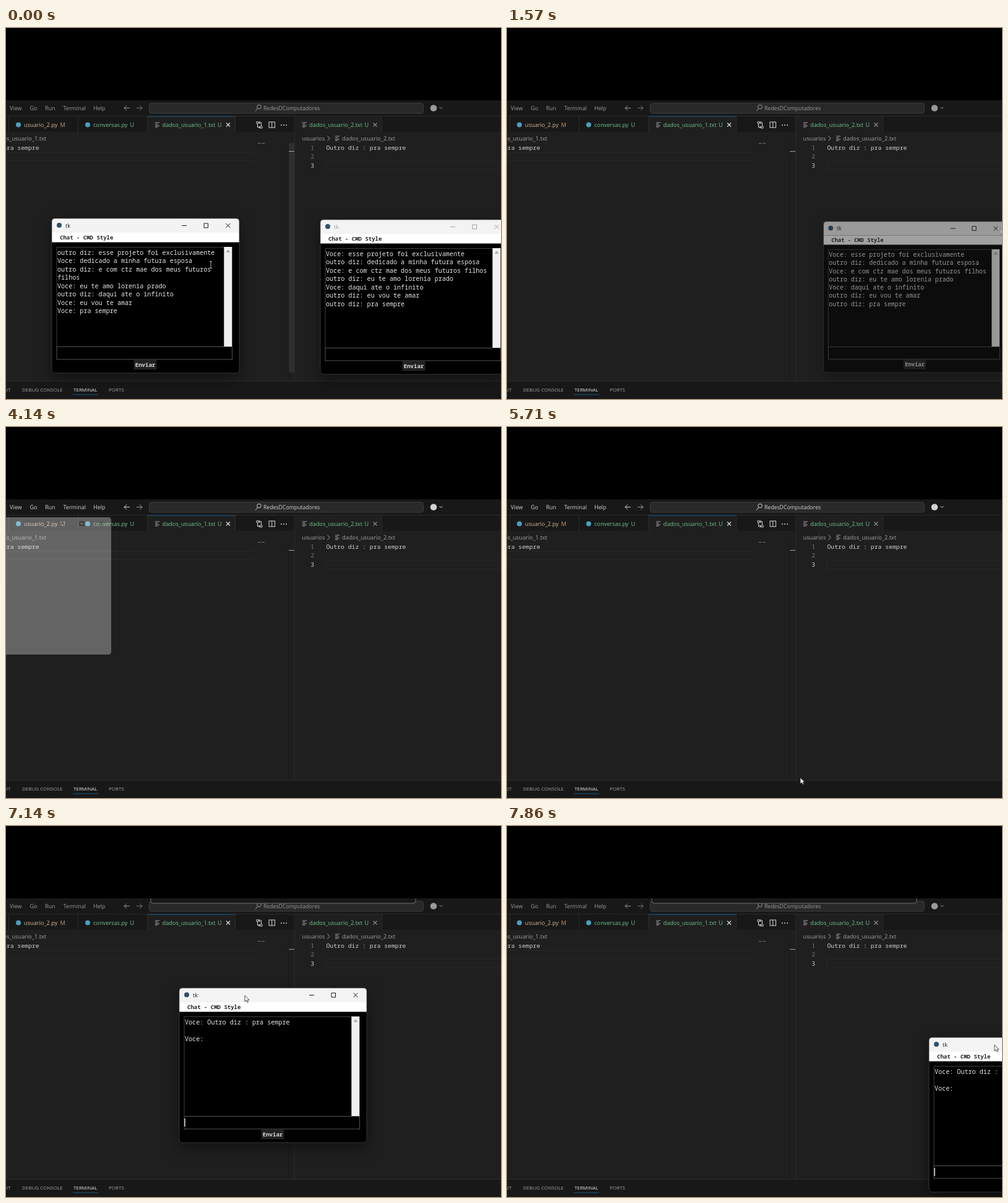
An HTML page for the animation above (8000 ms loop, 800x600 px).

```html
<!DOCTYPE html>
<html lang="pt-BR">
<head>
<meta charset="utf-8">
<title>Chat - CMD Style</title>
<style>
html, body { margin: 0; width: 100%; height: 100%; overflow: hidden; background: #000; }
svg { display: block; width: 800px; height: 600px; }
text { font-family: "Open Sans", "Noto Sans", sans-serif; font-size: 9.2px; fill: #a2a2a2; }
.mono { font-family: "Noto Sans Mono", "DejaVu Sans Mono", monospace; font-size: 9.77px; font-weight: 500; fill: #d0d0d0; }
.num { fill: #6e7681; text-anchor: end; }
.end { text-anchor: end; }
.line { fill: none; stroke: #a2a2a2; }
.green { fill: #70c48d; }
.small { font-size: 8px; }
#bar { color: #9a9a9a; }
#bar.focus { color: #d2d2d2; }
#bar text { fill: currentColor; font-size: 9px; }
#bar .line { stroke: currentColor; }
.chat { font-size: 10.1px; font-weight: 500; fill: #e6e6e6; }
.bold { font-size: 9px; font-weight: 700; }
.win { --ink: #1a1a1a; filter: drop-shadow(0 8px 12px rgba(0, 0, 0, .45)); }
.win.idle { --ink: #a0a0a0; }
.win .title { fill: var(--ink); font-size: 9px; }
.win .ctl { fill: none; stroke: var(--ink); }
</style>
</head>
<body>
<svg viewBox="0 0 800 600">
  <defs>
    <g id="file" class="line"><path d="M0 -3H7M0 -.5H4.5M0 2H7M0 4H4.5" stroke-width="1"/></g>
    <g id="cross"><path d="M-3 -3L3 3M3 -3L-3 3" fill="none" stroke-width="1.1"/></g>
  </defs>

  <rect width="800" height="600" fill="#000"/>
  <rect y="117" width="800" height="483" fill="#181818"/>
  <path d="M0 142.5H800" stroke="#2b2b2b"/>
  <rect y="168" width="800" height="404" fill="#1f1f1f"/>

  <g id="bar">
    <rect x="231.500" y="121.500" width="443" height="16.500" rx="4" fill="#292929" stroke="#3d3d3d"/>
    <text x="6" y="133.300">View</text><text x="38.500" y="133.300">Go</text>
    <text x="63" y="133.300">Run</text><text x="92.500" y="133.300">Terminal</text>
    <text x="141" y="133.300">Help</text>
    <path class="line" d="M200 129.500H191M195 125.500L191 129.500L195 133.500"/>
    <path class="line" d="M211 129.500H220M216 125.500L220 129.500L216 133.500" opacity=".7"/>
    <g class="line"><circle cx="409" cy="127.500" r="3.300"/><path d="M406.700 130L403 134.500"/></g>
    <text x="416" y="133" style="font-size:8.700px">RedesDComputadores</text>
    <circle cx="691" cy="129.500" r="5.300" fill="currentColor"/>
    <path class="line" d="M700.500 128L703 130.500L705.500 128"/>
  </g>

  <!-- tabs -->
  <rect x="229" y="143" width="141" height="26" fill="#1f1f1f"/>
  <rect x="468" y="143" width="139" height="26" fill="#1f1f1f"/>
  <path d="M4.500 143V168M116.500 143V168M228.500 143V168M370.500 143V168M607.500 143V168" stroke="#2b2b2b"/>
  <path d="M229 143H370" stroke="#17598c"/>
  <circle cx="20" cy="156.500" r="4" fill="#4c9dc0"/>
  <text x="29" y="160" style="fill:#d8b896">usuario_2.py</text>
  <text x="87.500" y="160" style="fill:#c9986f">M</text>
  <circle cx="132" cy="156.500" r="4" fill="#4c9dc0"/>
  <text x="141" y="160" class="green">conversas.py</text><text x="200.500" y="160" class="green">U</text>
  <use href="#file" x="241" y="156"/>
  <text x="252.500" y="160" class="green">dados_usuario_1.txt</text><text x="342" y="160" class="green">U</text>
  <use href="#cross" x="359" y="156.500" stroke="#e4e4e4"/>
  <g class="line" stroke-width="1.100" style="stroke:#c8c8c8">
    <circle cx="406.500" cy="153" r="1.700"/><circle cx="412.500" cy="160.500" r="1.700"/>
    <path d="M406.500 155V160.500H410M408.500 158.500L410.300 160.500L408.500 162.500M412.500 158.500V153H409M410.500 151L408.700 153L410.500 155"/>
    <rect x="425" y="152" width="9.500" height="9"/><path d="M429.700 152V161"/>
  </g>
  <g fill="#c8c8c8"><circle cx="445" cy="157" r="1"/><circle cx="449" cy="157" r="1"/><circle cx="453" cy="157" r="1"/></g>
  <use href="#file" x="479" y="156"/>
  <text x="490" y="160" class="green">dados_usuario_2.txt</text><text x="579.500" y="160" class="green">U</text>
  <use href="#cross" x="596.500" y="156.500" stroke="#8c8c8c"/>

  <!-- left editor -->
  <text x="65" y="182" class="end">dados_usuario_1.txt</text>
  <text x="53.500" y="196.700" class="mono end">Outro diz : pra sempre</text>
  <path d="M0 201.500H400M0 214.500H400" stroke="#282828"/>
  <path d="M407 186.500H411M412 186.500H413M414 186.500H418" stroke="#777"/>
  <path d="M456.500 186V572" stroke="#181818"/>
  <rect id="slider" x="457" y="186" width="9.500" height="371" fill="#2f2f2f"/>
  <path d="M457 199.500H466" stroke="#a0a0a0"/>
  <path d="M466.500 143V572" stroke="#2b2b2b"/>

  <!-- right editor -->
  <text x="478.500" y="182">usuarios</text>
  <path class="line" d="M519.500 174.500L523 178.500L519.500 182.500"/>
  <use href="#file" x="532" y="178"/>
  <text x="543" y="182">dados_usuario_2.txt</text>
  <text x="498" y="196.700" class="mono num">1</text>
  <text x="498" y="211.300" class="mono num">2</text>
  <text x="498" y="226" class="mono num" style="fill:#ccc">3</text>
  <text x="517.500" y="196.700" class="mono">Outro diz : pra sempre</text>
  <rect x="517.500" y="215.500" width="290" height="13.500" fill="none" stroke="#272727"/>

  <!-- panel -->
  <path d="M0 571.500H800" stroke="#2b2b2b"/>
  <text x="7.500" y="588.200" class="small end">OUTPUT</text>
  <text x="26" y="588.200" class="small">DEBUG CONSOLE</text>
  <text x="109" y="588.200" class="small" style="fill:#e2e2e2">TERMINAL</text>
  <text x="166" y="588.200" class="small">PORTS</text>
  <path d="M108 593H149" stroke="#17598c"/>

  <path id="snap" d="M234 117V121Q234 125 238 125H658Q662 125 662 121V117" fill="#181818" stroke="#707070"/>
  <g id="wins"></g>
  <g id="ghost"><rect width="303" height="250" rx="5" fill="#fff"/>
    <path d="M210 11.500H217M246 8H253V15H246ZM282 8L288 14M288 8L282 14" fill="none" stroke="#000"/></g>

  <g id="arrow"><path d="M0 0V10L2.400 7.900L4 11.300L5.600 10.500L4.100 7.200H7Z" fill="#fff" stroke="#222" stroke-width=".8"/></g>
  <g id="ibeam"><path d="M-2 -5.500H2M0 -5.500V5.500M-2 5.500H2" fill="none" stroke="#b5b5b5"/></g>
  <g id="resize"><path d="M0 -6L3 -2.500H.8V2.500H3L0 6L-3 2.500H-.8V-2.500H-3Z" fill="#fff" stroke="#222" stroke-width=".8"/></g>
</svg>
<script>
const W = 303, H = 250, FRAMES = 56, LOOP = 8000;
const $ = id => document.getElementById(id);

function makeWin(lines, caret) {
  const g = document.createElementNS("http://www.w3.org/2000/svg", "g");
  const rows = lines.map((s, i) =>
    `<text class="mono chat" x="9" y="${58.5 + i * 13.57}">${s}</text>`).join("");
  g.setAttribute("class", "win");
  g.innerHTML = `
    <rect width="${W}" height="${H}" rx="5" fill="#000"/>
    <path d="M0 23V5Q0 0 5 0H298Q303 0 303 5V23Z" fill="#f3f3f3"/>
    <rect y="23" width="${W}" height="15.500" fill="#fff"/>
    <circle cx="12" cy="11" r="4" fill="#31506f"/>
    <text class="title" x="22" y="14.500">tk</text>
    <path class="ctl" d="M210 11.500H218M246 8H252.500V15H246ZM281.500 8L288.500 15M288.500 8L281.500 15"/>
    <text class="mono bold" x="13" y="34.200" style="fill:#222">Chat - CMD Style</text>
    <path d="M8 207.500V46.500H279" fill="none" stroke="#404040"/>
    <rect x="278.300" y="46" width="13" height="161" fill="#f0f0f0"/>
    <path d="M281.500 55L285 50L288.500 55Z" fill="#b0b0b0"/>
    <rect x="8" y="207.500" width="283.500" height="20.500" fill="#000" stroke="#5c5c5c" stroke-width=".9"/>
    <rect x="132.500" y="229" width="37" height="15.500" fill="#222"/>
    <text class="mono bold" x="134.800" y="239.700" style="fill:#ddd">Enviar</text>
    ${rows}
    ${caret ? '<path d="M9 211V224" stroke="#fff" stroke-width="1.300"/>' : ""}
    <rect width="${W}" height="${H}" rx="5" fill="none" stroke="#484848" stroke-width=".7"/>`;
  $("wins").append(g);
  return g;
}

const talk = [
  "esse projeto foi exclusivamente", "dedicado a minha futura esposa",
  "e com ctz mae dos meus futuros filhos", "eu te amo lorenia prado",
  "daqui ate o infinito", "eu vou te amar", "pra sempre"];
const said = mine => talk.map((s, i) => (mine.includes(i) ? "Voce: " : "outro diz: ") + s);
const leftLines = said([1, 3, 5, 6]);
leftLines.splice(2, 1, leftLines[2].replace(" filhos", ""), "filhos");
const fresh = ["Voce: Outro diz : pra sempre", "", "Voce:"];

const right = makeWin(said([0, 2, 4]));
const left = makeWin(leftLines);
const first = makeWin(fresh, true);
const second = makeWin(fresh, true);

// Places an element by its unscaled corner, scaled around the window centre.
function pose(el, x, y, alpha = 1, k = 1) {
  el.style.display = alpha > 0 ? "" : "none";
  el.setAttribute("opacity", alpha);
  el.setAttribute("transform",
    `translate(${x + W / 2 * (1 - k)} ${y + H / 2 * (1 - k)}) scale(${k})`);
}

// Fade and shrink over three steps, starting at step n.
function closing(el, x, y, f, n) {
  const i = f - n;
  const [a, k] = i < 0 ? [1, 1] : i === 0 ? [.58, .977] : i === 1 ? [.15, .92] : [0, 1];
  pose(el, x, y, a, k);
}

const start = [-88.5, 156.5];
const drag = [[-60, 165], [90, 205], [280, 262], [430, 300], [515, 318], [575, 326], [635, 335], [682, 342]];
const toClose = [[331, 383], [347, 343], [357, 318], [358, 318], [430, 319], [600, 321], [740, 322], [787, 323], [787, 323], [795, 324], [797, 324], [797, 324]];
const toTop = [[474, 567], [420, 530], [330, 450], [220, 340], [120, 250], [50, 185], [21, 160], [19, 168]];

function cursor(f, wx, wy) {
  const p = f < 12 ? toClose[f] : f < 40 ? null : f < 48 ? toTop[f - 40] : [wx + 106, wy + 12];
  const kind = f === 0 ? "ibeam" : f === 46 ? "resize" : "arrow";
  for (const id of ["arrow", "ibeam", "resize"]) {
    const on = p && id === kind;
    $(id).style.display = on ? "" : "none";
    if (on) $(id).setAttribute("transform", `translate(${p})`);
  }
  $("arrow").setAttribute("opacity", f === 11 ? .3 : 1);
}

function draw(f) {
  closing(left, 74, 308, f, 3);
  closing(right, 508, 310, f, 11);
  right.classList.toggle("idle", f < 4);

  const [wx, wy] = f < 48 ? start : drag[f - 48];
  pose(first, -116, 132, f >= 30 && f < 40 ? 1 : 0);
  pose(second, wx, wy, f >= 44 ? 1 : 0);
  const [gx, gy] = f === 43 ? start : [-116, 132];
  pose($("ghost"), gx, gy, f === 29 || f === 43 ? .31 : 0, .888);

  $("bar").classList.toggle("focus", f >= 19 && f < 30 || f >= 40 && f < 44);
  $("slider").setAttribute("opacity", f < 5 || f >= 41 && f < 48 ? 1 : f === 5 || f === 48 ? .5 : 0);
  $("snap").style.display = f >= 50 ? "" : "none";
  cursor(f, wx, wy);
}

let shown = -1;
function tick() {
  const t = performance.now() % LOOP;
  const f = Math.floor(t * FRAMES / LOOP + .035) % FRAMES;
  if (f !== shown) draw(shown = f);
  requestAnimationFrame(tick);
}
tick();
</script>
</body>
</html>
```
